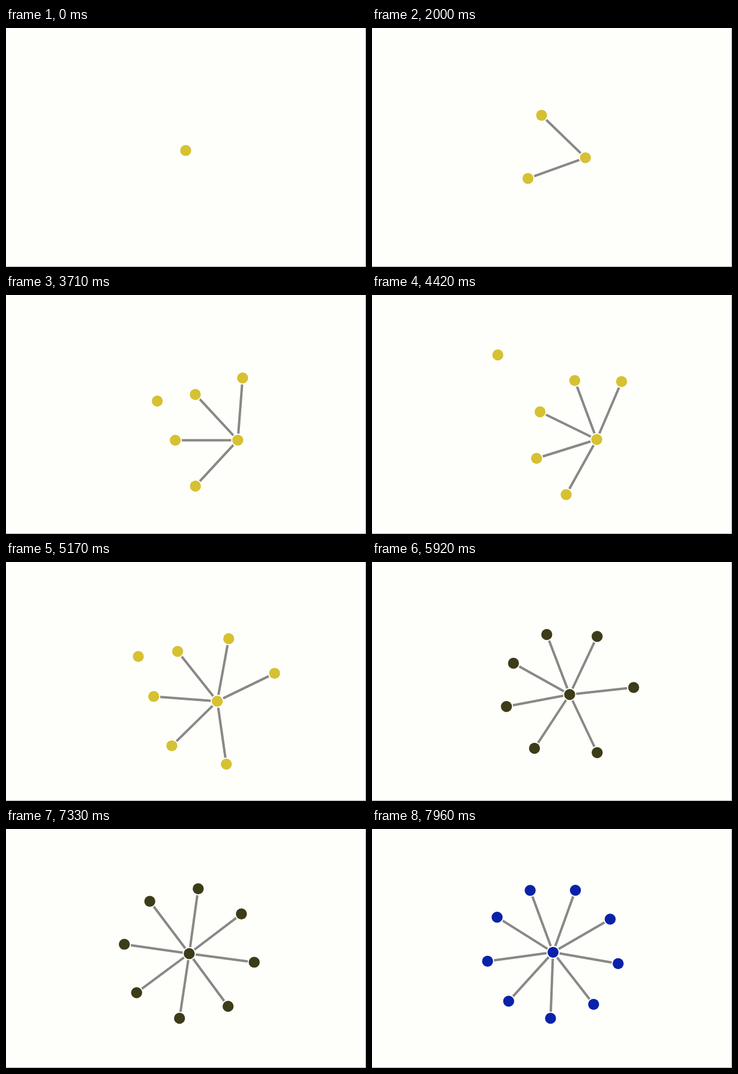
Write an HTML page with a canvas that moves like this. It is 600x399 px and loops after 8 s.

```html
<!DOCTYPE html>
<html lang="en">
<head>
<meta charset="utf-8">
<title>Growing star graph</title>
<style>
  html, body { margin: 0; width: 100%; height: 100%; overflow: hidden; background: #fefefb; }
  canvas { display: block; }
</style>
</head>
<body>
<canvas id="stage" width="600" height="399"></canvas>
<script>
const ctx = document.getElementById('stage').getContext('2d');
const LOOP = 8;
const HOME = { x: 299.5, y: 204.5 };
const COLORS = { paper: '#fefefb', edge: '#a8a8a4', link: '#888886', lone: '#d6c132', dark: '#3c3c18', blue: '#0a22a8' };

// Seconds at which satellites fly in from the top left corner.
const BIRTHS = [0.23, 1.05, 2.7, 2.79, 3.45, 4.28, 4.91, 6.52, 7.38];
const FLIGHT = 0.6;
const FLIGHT_LENGTH = 250;
const ENTRY_ANGLE = 217;

const mix = (a, b, u) => a + (b - a) * u;
const clamp01 = u => Math.min(1, Math.max(0, u));
const bell = (t, peak, width) => Math.exp(-(((t - peak) / width) ** 2));
const sum = list => list.reduce((a, b) => a + b, 0);

function polar(from, degrees, r) {
  const a = degrees * Math.PI / 180;
  return { x: from.x + r * Math.cos(a), y: from.y + r * Math.sin(a) };
}

// Middle direction of the fan of links, in degrees.
const fanAngle = t => 212 - 54 * Math.exp(-t / 2);

// The fan widens steadily, then relaxes towards a full star.
function fanSpan(t) {
  const opening = 4.42;
  return t < opening ? Math.max(0, 174 + 45.5 * (t - opening)) : 322 - 148 * Math.exp(opening - t);
}

// The hub drifts away from its satellites while the star is lopsided.
function hubAt(t) {
  const push = 95 * bell(t, 3.6, 2.3) * (1 - Math.exp(-2 * t));
  return polar(HOME, fanAngle(t) + 180, push);
}

function satellitesAt(t, hub) {
  const flights = BIRTHS.filter(b => b <= t).map(b => clamp01((t - b) / FLIGHT));
  const joining = flights.map(u => clamp01(2 * u - 1));
  const joined = sum(joining);
  const seen = sum(flights.map(u => Math.min(1, 5 * u)));
  const radius = 99 + 1.4 * t;
  const bend = 0.2 * bell(t, 5.8, 0.6);

  return flights.map((u, i) => {
    // Newcomers take the middle; older ones are pushed out on alternating sides.
    const count = mix(seen, joined, joining[i]);
    const rank = (count - 1) / 2 - Math.floor(i / 2);
    const place = (i % 2 ? 2 : -2) * rank / Math.max(count - 1, 1);
    const slot = fanAngle(t) + fanSpan(t) / 2 * mix(place, place ** 3, bend);
    const away = (1 - u) ** 3;
    const p = polar(hub, mix(slot, ENTRY_ANGLE, away), radius + FLIGHT_LENGTH * away);
    return { ...p, linked: u > 0.5 };
  });
}

function disc(p, r, color) {
  ctx.fillStyle = color;
  ctx.beginPath();
  ctx.arc(p.x, p.y, r, 0, Math.PI * 2);
  ctx.fill();
}

function drawNode(p, color) {
  disc(p, 11, '#fff');
  disc(p, 9.2, color);
}

function draw(t) {
  ctx.fillStyle = COLORS.paper;
  ctx.fillRect(0, 0, 600, 399);
  ctx.fillStyle = COLORS.edge;
  ctx.fillRect(599, 0, 1, 399);
  ctx.fillRect(0, 398, 600, 1);

  const hub = hubAt(t);
  const nodes = satellitesAt(t, hub);
  const linked = nodes.filter(p => p.linked);

  ctx.strokeStyle = COLORS.link;
  ctx.lineWidth = 4;
  ctx.beginPath();
  for (const p of linked) {
    ctx.moveTo(hub.x, hub.y);
    ctx.lineTo(p.x, p.y);
  }
  ctx.stroke();

  // The whole cluster changes colour as it grows.
  const group = linked.length >= 9 ? COLORS.blue : linked.length >= 7 ? COLORS.dark : COLORS.lone;
  drawNode(hub, group);
  for (const p of nodes) drawNode(p, p.linked ? group : COLORS.lone);
}

const start = performance.now();
function tick() {
  draw((performance.now() - start) / 1000 % LOOP);
  requestAnimationFrame(tick);
}
tick();
</script>
</body>
</html>
```
